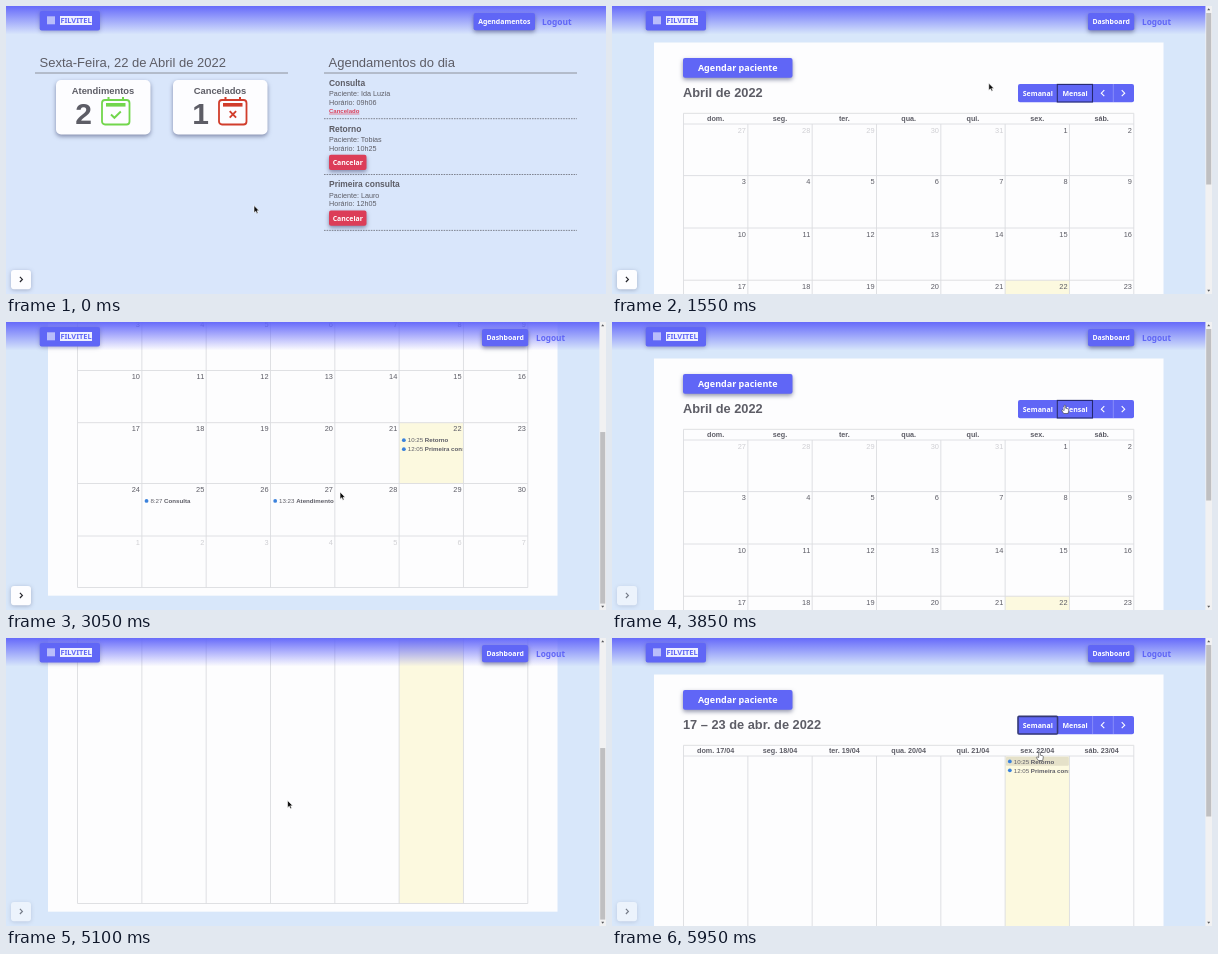
Animation, 600 px wide and 288 px high, one loop 6000 ms. Source, as an HTML page:

```html
<!DOCTYPE html>
<html lang="pt-BR">
<head>
<meta charset="utf-8">
<title>Agenda</title>
<style>
html, body { margin: 0; width: 100%; height: 100%; overflow: hidden; background: #d9e7fa; }
svg { display: block; width: 600px; height: 288px; }
text { font-family: "Liberation Sans", Arial, sans-serif; white-space: pre; }
.ui { font-family: "Noto Sans", "Open Sans", sans-serif; }
.shadow { filter: drop-shadow(0 2px 2px rgba(40, 45, 90, .5)); }
.soft { filter: drop-shadow(0 1px 2px rgba(40, 45, 90, .3)); }
</style>
</head>
<body>
<svg id="stage" viewBox="0 0 600 288">
  <defs>
    <linearGradient id="fade" x1="0" y1="0" x2="0" y2="1">
      <stop offset="0" stop-color="#6266fa" stop-opacity=".97"/>
      <stop offset="1" stop-color="#6266fa" stop-opacity="0"/>
    </linearGradient>
    <clipPath id="clipToday"><rect x="393" y="100" width="63.5" height="350"/></clipPath>
  </defs>
</svg>
<script>
const LOOP = 6000, MAX_SCROLL = 173.5;
const BLUE = '#6066f6', RED = '#dc3d58', INK = '#5d5d66', GRID = '#dcdde0';
const LEFT = 71.5, COL = 64.33, TOP = 118, BOTTOM = 439;
const stage = document.getElementById('stage');

function el(parent, tag, attrs) {
  const node = document.createElementNS('http://www.w3.org/2000/svg', tag);
  for (const k in attrs) node.setAttribute(k, attrs[k]);
  parent.appendChild(node);
  return node;
}
const group = (parent, attrs = {}) => el(parent, 'g', attrs);
const rect = (parent, x, y, width, height, fill, more = {}) =>
  el(parent, 'rect', { x, y, width, height, fill, ...more });
const path = (parent, d, stroke, width, more = {}) =>
  el(parent, 'path', { d, stroke, 'stroke-width': width, fill: 'none', ...more });
function text(parent, s, x, y, size, more = {}) {
  const t = el(parent, 'text', { x, y, 'font-size': size, fill: INK, ...more });
  t.textContent = s;
  return t;
}
const BOLD = { 'font-weight': 700 };
const MID = { 'text-anchor': 'middle' };
const UI = { class: 'ui', 'font-weight': 700, 'text-anchor': 'middle', fill: '#fff' };

function button(parent, label, x, y, w, h, size, fill = BLUE) {
  rect(parent, x, y, w, h, fill, { rx: 2, class: 'shadow' });
  text(parent, label, x + w / 2, y + h / 2 + size * .35, size, UI);
}

// Day summary page
const home = group(stage);
rect(home, 0, 0, 600, 288, '#d9e6fb');

function heading(label, x) {
  text(home, label, x + 4.5, 61.2, 13);
  path(home, `M${x} 67H${x + 253}`, '#85878f', .9);
}
heading('Sexta-Feira, 22 de Abril de 2022', 29);
heading('Agendamentos do dia', 318);

function card(x, label, count, color, mark) {
  rect(home, x, 74, 94.5, 54.5, '#fdfdff', { rx: 5, class: 'shadow' });
  text(home, label, x + 47, 88, 9.4, { ...BOLD, ...MID });
  text(home, count, x + 27.5, 117.5, 30, { ...BOLD, ...MID });
  const icon = group(home, { transform: `translate(${x + 45} 91)` });
  rect(icon, 1, 3, 27.5, 24.5, 'none', { rx: 3, stroke: color, 'stroke-width': 1.8 });
  path(icon, 'M7.5 0V4M22 0V4', color, 2);
  rect(icon, 5, 6, 19.5, 3.6, color);
  path(icon, mark, color, 1.9);
}
card(50, 'Atendimentos', '2', '#72d64c', 'M10 17.5l3.4 3.3l6.4-6.3');
card(167, 'Cancelados', '1', '#d13d2c', 'M11.7 14.2l6.4 6.4m0-6.4l-6.4 6.4');

function visit(y, title, name, hour, canceled) {
  text(home, title, 323, y, 8.45, BOLD);
  text(home, 'Paciente: ' + name, 323, y + 10.8, 7.2);
  text(home, 'Horário: ' + hour, 323, y + 19, 7.2);
  if (canceled) {
    text(home, 'Cancelado', 323, y + 27.2, 6, { ...BOLD, fill: RED, 'text-decoration': 'underline' });
  } else {
    button(home, 'Cancelar', 323, y + 23.3, 37.5, 15.2, 6.9, RED);
  }
}
visit(79.5, 'Consulta', 'Ida Luzia', '09h06', true);
visit(125.5, 'Retorno', 'Tobias', '10h25');
visit(181.2, 'Primeira consulta', 'Lauro', '12h05');
for (const y of [112.7, 168.5, 224.4])
  path(home, `M318 ${y}H571`, '#777a85', .9, { 'stroke-dasharray': '1.6 1' });

// Calendar page
const agenda = group(stage);
rect(agenda, 0, 0, 600, 288, '#d8e7fa');
const sheet = group(agenda);
rect(sheet, 42, 36.5, 509.5, 410.7, '#fdfdfe');
button(sheet, 'Agendar paciente', 71, 52, 109.5, 19.7, 9);

rect(sheet, 406, 78, 116, 18.3, BLUE, { rx: 2 });
path(sheet, 'M445.3 78v18M480.6 78v18M501.3 78v18', '#9a9dfb', .7);
text(sheet, 'Semanal', 425.8, 89.7, 7, UI);
text(sheet, 'Mensal', 463, 89.7, 7, UI);
path(sheet, 'M492.3 84.2l-3 3l3 3M509.7 84.2l3 3l-3 3', '#fff', 1.1);

const colX = i => LEFT + i * COL;
const DAYS = ['dom.', 'seg.', 'ter.', 'qua.', 'qui.', 'sex.', 'sáb.'];

function event(parent, col, y, time, title) {
  const g = group(parent, col === 5 ? { 'clip-path': 'url(#clipToday)' } : {});
  const x = colX(col);
  el(g, 'circle', { cx: x + 4.7, cy: y, r: 1.9, fill: '#3b82dc' });
  const t = text(g, time + ' ', x + 8.6, y + 2.2, 6.15);
  el(t, 'tspan', BOLD).textContent = title;
}

function view(title, rows, dayLabel, todayTop, todayEnd) {
  const g = group(sheet);
  text(g, title, 71, 91.2, 12.8, BOLD);
  rect(g, colX(5), todayTop, COL, todayEnd - todayTop, '#fcf9df');
  let d = `M${LEFT} 107.3H${colX(7)}M${LEFT} ${BOTTOM}H${colX(7)}`;
  for (const y of rows) d += `M${LEFT} ${y}H${colX(7)}`;
  for (let i = 0; i < 8; i++) d += `M${colX(i)} ${i % 7 ? TOP : 107.3}V${BOTTOM}`;
  path(g, d, GRID, .9);
  DAYS.forEach((day, i) =>
    text(g, dayLabel(day, i), colX(i) + COL / 2, 115.2, 7.2, { ...BOLD, ...MID }));
  return g;
}

const ROWS = [TOP, 169.6, 222, 274.2, 335, 387.5];
const month = view('Abril de 2022', ROWS, day => day, ROWS[3], ROWS[4]);
for (let i = 0; i < 42; i++) {
  const n = i - 4, inside = n > 0 && n < 31;
  const day = n < 1 ? n + 31 : n > 30 ? n - 30 : n;
  text(month, day, colX(i % 7 + 1) - 1.9, ROWS[Math.floor(i / 7)] + 8.7, 7.4,
    { 'text-anchor': 'end', fill: inside ? INK : '#cfcfd3' });
}
event(month, 5, 291.7, '10:25', 'Retorno');
event(month, 5, 300.7, '12:05', 'Primeira consulta');
event(month, 1, 352.4, '8:27', 'Consulta');
event(month, 3, 352.4, '13:23', 'Atendimento');

const week = view('17 – 23 de abr. de 2022', [TOP], (day, i) => `${day} ${17 + i}/04`, TOP, BOTTOM);
const hover = rect(week, 394, 119, 62.8, 8.7, '#e5e1c9', { rx: 1 });
event(week, 5, 123.4, '10:25', 'Retorno');
event(week, 5, 132.3, '12:05', 'Primeira consulta');

const monthRing = rect(sheet, 445.3, 78.4, 35.2, 17.6, 'none', { stroke: '#25286e', 'stroke-width': 1.1 });
const weekRing = rect(sheet, 406, 78.4, 39.5, 17.6, 'none', { rx: 1, stroke: '#343875', 'stroke-width': 1.6 });

rect(agenda, 593.4, 0, 6.6, 288, '#f1f1f2');
const thumb = rect(agenda, 594.2, 7, 5, 171.5, '#bfbfc1');
path(agenda, 'M595.2 4.3h3l-1.5-2zM595.2 283.7h3l-1.5 2z', 'none', 0, { fill: '#55565a' });

// Fixed top bar and side toggle
const bar = group(stage);
const shade = rect(bar, 0, 0, 600, 28.5, 'url(#fade)');
rect(bar, 33.7, 5, 60.3, 19.4, BLUE, { rx: 2, class: 'soft' });
rect(bar, 41, 10.3, 8, 8, '#b9bdfb');
rect(bar, 54, 10, 32, 9, '#eef0ff');
text(bar, 'FILVITEL', 70, 17.3, 7.4, { ...UI, fill: BLUE });

function nav(label, x, w, exitX, size) {
  const g = group(bar);
  button(g, label, x, 7, w, 17.2, 6.9);
  text(g, 'Logout', exitX, 18.5, size, { class: 'ui', 'font-weight': 700, fill: BLUE });
  return g;
}
const homeNav = nav('Agendamentos', 467.6, 61.4, 536, 8.4);
const agendaNav = nav('Dashboard', 476, 46.2, 530, 8.25);

const toggle = group(stage);
rect(toggle, 5, 264, 20, 19.3, '#fdfdff', { rx: 3, class: 'soft' });
path(toggle, 'M13.9 270.8l2.5 2.6l-2.5 2.6', '#26262c', 1.2);

// Pointer
const pointer = group(stage);
const arrow = path(pointer, 'M0 0V7.2L1.7 5.7L2.9 8.2L4.1 7.6L3 5.3H5.2Z', '#fff', .6, { fill: '#0c0c0c' });
const hand = path(pointer,
  'M-.8 0Q0-.9 .8 0V2.7L3.2 3.3Q3.9 3.6 3.8 4.6L3.2 8H-1.2L-3.2 5Q-2.8 4-1.6 4.7L-.8 5Z',
  '#33343c', .6, { fill: '#fff' });

// [time, x, y]
const TRACK = [
  [0, 248, 199.5], [150, 248, 199.5], [700, 497, 16], [950, 497, 16], [1550, 377, 77],
  [1900, 300, 128], [2350, 272, 139.5], [3050, 334, 170], [3300, 342, 162], [3850, 453, 83.5],
  [4130, 427, 87], [4330, 427, 87], [4750, 300, 152], [5100, 281.5, 162.5], [5350, 300, 158],
  [5850, 427.5, 114.5], [6000, 427.5, 114.5]
];
// [time, offset]
const SCROLL = [
  [0, 0], [1850, 0], [2350, 84.5], [2850, MAX_SCROLL], [3250, MAX_SCROLL], [3700, 0],
  [4500, 0], [5000, MAX_SCROLL], [5350, MAX_SCROLL], [5920, 0], [6000, 0]
];
const HANDS = [[640, 1000], [3800, 4400], [5900, 6000]];

function at(keys, t, i) {
  const k = keys.findIndex(key => key[0] > t);
  const a = keys[k - 1], b = keys[k];
  return a[i] + (b[i] - a[i]) * (t - a[0]) / (b[0] - a[0]);
}
const show = (node, on) => node.setAttribute('display', on ? 'inline' : 'none');

function draw(t) {
  const inAgenda = t >= 1000, weekly = t >= 4250;
  const offset = at(SCROLL, t, 1);
  show(home, !inAgenda);
  show(homeNav, !inAgenda);
  show(agenda, inAgenda);
  show(agendaNav, inAgenda);
  show(month, !weekly);
  show(monthRing, !weekly);
  show(week, weekly);
  show(weekRing, weekly);
  show(hover, t >= 5900);
  shade.setAttribute('width', inAgenda ? 593.4 : 600);
  sheet.setAttribute('transform', `translate(0 ${-offset})`);
  thumb.setAttribute('y', 7 + offset * .594);
  toggle.setAttribute('opacity', 1 - .45 * Math.min(1, Math.max(0, (t - 3300) / 500)));

  const grab = HANDS.some(([from, to]) => t >= from && t < to);
  show(hand, grab);
  show(arrow, !grab);
  pointer.setAttribute('transform', `translate(${at(TRACK, t, 1)} ${at(TRACK, t, 2)})`);
}

const start = performance.now();
function tick() {
  draw((performance.now() - start) % LOOP);
  requestAnimationFrame(tick);
}
tick();
</script>
</body>
</html>
```
